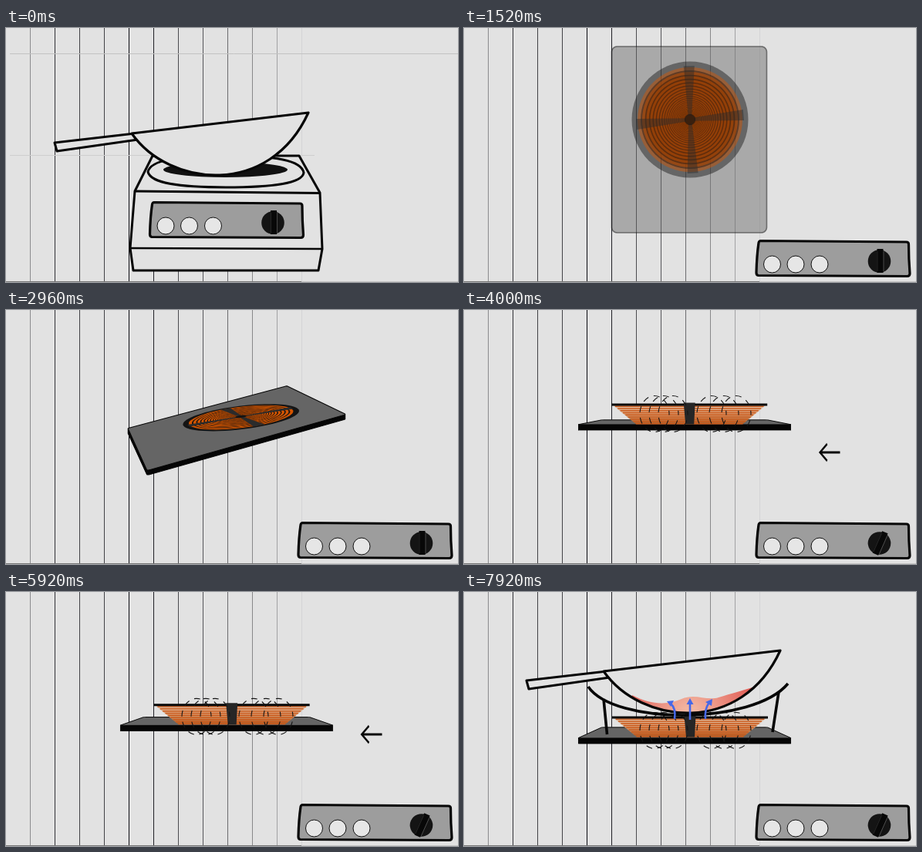
These frames come from a looping animation (586 by 330 pixels, 8000 ms). An HTML page with a canvas:

```html
<!DOCTYPE html>
<html lang="en">
<head>
<meta charset="utf-8">
<title>Cooker, taken apart</title>
<style>
  html, body { margin: 0; width: 100%; height: 100%; overflow: hidden; background: #e2e2e2; }
  canvas { display: block; width: 586px; height: 330px; }
</style>
</head>
<body>
<canvas id="stage" width="586" height="330"></canvas>
<script>
const ctx = document.getElementById('stage').getContext('2d');
const LOOP = 8000, BG = '#e2e2e2', INK = '#060606', ORANGE = '#d45500';
const TAU = Math.PI * 2, DEG = Math.PI / 180;

const mix = (a, b, p) => a + (b - a) * p;
const ramp = (t, from, to) => Math.min(1, Math.max(0, (t - from) / (to - from)));
const ease = (t, from, to) => {
  const p = ramp(t, from, to);
  return p < 0.5 ? 2 * p * p : 1 - 2 * (1 - p) ** 2;
};

function paint(path, fill, stroke, width = 3) {
  if (fill) { ctx.fillStyle = fill; ctx.fill(path); }
  if (stroke) { ctx.strokeStyle = stroke; ctx.lineWidth = width; ctx.stroke(path); }
}

function group(x, y, draw, alpha = 1) {
  ctx.save();
  ctx.translate(x, y);
  ctx.globalAlpha *= alpha;
  draw();
  ctx.restore();
}

function polygon(points) {
  const path = new Path2D();
  points.forEach(([x, y]) => path.lineTo(x, y));
  path.closePath();
  return path;
}

function oval(x, y, rx, ry = rx) {
  const path = new Path2D();
  path.ellipse(x, y, rx, ry, 0, 0, TAU);
  return path;
}

function line(x1, y1, x2, y2, color, width) {
  paint(new Path2D(`M${x1},${y1}L${x2},${y2}`), null, color, width);
}

function drawGrid(t) {
  const strength = [0.4, 0.82, 0.75, 0.75, 1, 0.9, 0.7, 0.65, 0.55, 0.42, 0.3, 0.06];
  strength.forEach((a, i) => line(31.5 + 32 * i, 0, 31.5 + 32 * i, 330, `rgba(12,12,18,${a})`, 1));
  line(0, 329.5, 383, 329.5, '#777', 1);
  line(383, 329.5, 586, 329.5, '#c4c4c4', 1);
  if (t >= 1200) return;
  ctx.save();
  if (t > 500) ctx.setLineDash([30, 9]);
  line(5, 33.5, t > 500 ? 130 : 586, 33.5, '#c2c2c2', 1);
  line(5, 165.5, t > 500 ? 158 : 400, 165.5, '#cecece', 1);
  ctx.restore();
}

function drawStove() {
  paint(polygon([[190, 166], [380, 166], [407, 214], [410, 287], [405, 315], [165, 315], [161, 286], [167, 212]]), BG, INK);
  line(167, 212, 407, 214.5, INK, 3);
  line(161, 286, 410, 287, INK, 2.5);
  const rim = new Path2D('M184,187C187,172 220,166 285,166S383,172 386,188C384,202 345,207 285,207S188,202 184,187Z');
  paint(rim, BG, INK);
  paint(oval(284.5, 184, 80.5, 10), '#111');
}

const panelShape = new Path2D('M192,226.5L381,228Q384,228 384,231Q384,250 385.5,269Q385.5,272.5 382,272.5L189,271.5Q186.5,271 186.5,268Q187,246 189.5,229Q190,226.5 192,226.5Z');

function drawPanel(turn) {
  paint(panelShape, '#9d9d9d', INK, 3.2);
  for (const x of [207, 237.5, 268.5]) paint(oval(x, 257, 11), '#e6e6e6', '#111', 1);
  group(346, 253, () => {
    ctx.rotate(turn);
    paint(oval(0, 0, 14.8), '#141414');
    ctx.fillStyle = '#080808';
    ctx.fillRect(-3, -16, 8, 31);
    line(5.5, -13, 5.5, 13, '#555', 0.8);
    line(-2.5, -13, -2.5, 13, '#2c2c2c', 0.8);
  });
}

const wokBowl = new Path2D('M163,137C212,207 342,220 392,110Z');

function drawWok(food) {
  paint(polygon([[63, 149], [167, 137], [171, 145], [66, 160]]), BG, INK);
  paint(wokBowl, BG);
  if (food > 0) {
    ctx.save();
    ctx.clip(wokBowl);
    const glow = ctx.createRadialGradient(275, 195, 4, 275, 190, 95);
    glow.addColorStop(0, '#f4bda6');
    glow.addColorStop(0.45, '#ea8b7d');
    glow.addColorStop(1, '#e0504b');
    ctx.globalAlpha *= food;
    paint(new Path2D('M200,168C225,181 246,181 264,173S296,176 312,171S345,162 370,153V200H200Z'), glow);
    ctx.restore();
  }
  paint(wokBowl, null, INK, 3.2);
}

// Projects a point given in its own centred plane onto the stage.
function projector(cx, cy, spin, tilt, squash, roll) {
  return (u, v) => {
    const x = u * Math.cos(spin) - v * Math.sin(spin);
    const depth = u * Math.sin(spin) + v * Math.cos(spin);
    const y = depth * squash;
    const w = 1 / (1 - 0.00125 * Math.sin(tilt) * depth);
    return [
      cx + w * (x * Math.cos(roll) - y * Math.sin(roll)),
      cy + w * (x * Math.sin(roll) + y * Math.cos(roll))
    ];
  };
}

function drawCoil(at) {
  const polar = (r, a) => at(r * Math.cos(a), r * Math.sin(a));
  const disc = (r, color) => {
    const points = [];
    for (let i = 0; i < 64; i++) points.push(polar(r, i / 64 * TAU));
    paint(polygon(points), color);
  };
  disc(75.5, '#141414');
  for (let i = 0; i < 25; i++) {
    const r = 68 * 0.912 ** i;
    disc(r, ORANGE);
    disc(r * 0.941, '#1b1512');
  }
  for (const degrees of [-5, 87, 175, 269]) {
    const a = degrees * DEG;
    paint(polygon([polar(70, a - 0.1), polar(70, a + 0.1), polar(6, a + 0.4), polar(6, a - 0.4)]), '#2b2b2b');
  }
  disc(7.2, '#141414');
}

function drawPlate(t, showCoil) {
  const p = ease(t, 2380, 3180), drop = ease(t, 5640, 6150);
  const spin = 90 * DEG * p ** 0.87, tilt = 88.3 * DEG * p ** 1.1;
  const squash = Math.cos(tilt) + 0.039 * drop;
  const roll = -130 * DEG * p ** 3 * (1 - p);
  const project = projector(mix(292, 286, p), mix(145, 145.5, p) + 36.5 * drop, spin, tilt, squash, roll);

  const radius = mix(7, 2, p), outline = [];
  [[1, 1], [-1, 1], [-1, -1], [1, -1]].forEach(([sx, sy], corner) => {
    for (let i = 0; i <= 5; i++) {
      const a = (corner + i / 5) * Math.PI / 2;
      outline.push(project(
        sx * (100.5 - radius) + radius * Math.cos(a),
        sy * (121 - radius) + radius * Math.sin(a)
      ));
    }
  });
  const top = polygon(outline), edge = mix(1.6, 1, p);
  for (let h = Math.round(6.5 * p); h > 0; h--) group(0, h, () => paint(top, INK, INK, edge));
  paint(top, '#656565', INK, edge);
  if (!showCoil) return;

  // The coil lifts off the plate and levels out ahead of it.
  const [x, y] = project(1, -26 + 20 * p ** 6);
  drawCoil(projector(x, y - 4 * p ** 3, spin, tilt, squash * (1 - 0.33 * p), roll * (1 - 0.5 * p)));
}

function drawCone(t, grow) {
  const drop = ease(t, 5640, 6150);
  const base = 148.5 + 40 * drop, height = 25.5 * grow, cx = 292.2 + drop * 0.8;
  const topHalf = mix(72, 100, grow), lowHalf = 69;
  const y0 = base - height;
  const body = ctx.createLinearGradient(0, y0, 0, base);
  body.addColorStop(0, '#e3cbb5');
  body.addColorStop(0.5, '#d79b70');
  body.addColorStop(1, '#a8571f');
  paint(polygon([[cx - topHalf, y0], [cx + topHalf, y0], [cx + lowHalf, base], [cx - lowHalf, base]]), body);
  for (let i = 0; i < 9; i++) {
    const f = (i + 0.8) / 9.2, half = mix(topHalf, lowHalf, f) - 1;
    line(cx - half, y0 + height * f, cx + half, y0 + height * f, '#cb5a1c', 1.5 * grow);
  }
  line(cx - topHalf - 1, y0, cx + topHalf + 1, y0, INK, 3);
  paint(polygon([[cx - 7.5, y0 - 2.5], [cx + 7.5, y0 - 2.5], [cx + 6, base], [cx - 5, base]]), '#262626');
}

const phase = t => (t - 6640) / 1120 * TAU;

function drawField(t) {
  const y = 135 + 45 * ease(t, 5640, 6150);
  ctx.save();
  ctx.setLineDash([8, 7]);
  ctx.lineDashOffset = 30 * Math.sin(phase(t));
  for (const x of [247, 259, 271, 321, 337, 353]) paint(oval(x, y, 19, 23.5), null, '#151515', 1.1);
  ctx.restore();
}

function drawCurrent(t) {
  group(487.5, 185, () => {
    ctx.scale(Math.cos(phase(t)), 1);
    ctx.lineJoin = 'miter';
    paint(new Path2D('M0,0H41M27,-11L42,0L27,11'), null, INK, 3);
  });
}

function drawSupport() {
  paint(new Path2D('M161,123C195,173 375,173 420,119'), null, INK, 3.6);
  paint(new Path2D('M181,139L185.5,185M408,130L400,182'), null, INK, 3.6);
}

function drawHeat(grow) {
  const blue = '#4668e8';
  ctx.save();
  ctx.beginPath();
  ctx.rect(250, 166 - 29 * grow, 90, 29 * grow);
  ctx.clip();
  paint(new Path2D('M273,165Q275,151 268,145M293,166V145M313,165Q312,152 317,145'), null, blue, 2.6);
  paint(polygon([[263, 142], [272, 141], [268, 149]]), blue);
  paint(polygon([[293, 138], [297.5, 146], [288.5, 146]]), blue);
  paint(polygon([[322, 139], [321, 148], [313, 143]]), blue);
  ctx.restore();
}

function draw(t) {
  ctx.fillStyle = BG;
  ctx.fillRect(0, 0, 586, 330);
  ctx.lineJoin = 'round';
  drawGrid(t);

  if (t < 600) group(0, 0, drawStove, 1 - ramp(t, 80, 560));
  const turn = 0.42 * ease(t, 3560, 4040);
  group(192.5 * ease(t, 80, 880), 50 * ease(t, 80, 1040), () => drawPanel(turn));
  if (t < 800) group(0, -205 * ease(t, 80, 720), () => drawWok(0));

  const cone = ease(t, 3180, 3720);
  if (t > 1200) group(0, 0, () => drawPlate(t, cone === 0), ramp(t, 1200, 1900));
  if (cone > 0) drawCone(t, cone);
  if (t > 3880) drawField(t);
  if (t > 3880 && t < 7200) drawCurrent(t);

  if (t > 5900) group(0, -190 * (1 - ease(t, 5900, 6735)), drawSupport);
  if (t > 6480) {
    const fall = -170 * (1 - ease(t, 6480, 7280));
    group(18, -34 + fall, () => drawWok(ramp(t, 7360, 7640)));
  }
  if (t > 7520) drawHeat(ease(t, 7520, 7880));
}

const start = performance.now();
function tick() {
  draw((performance.now() - start) % LOOP);
  requestAnimationFrame(tick);
}
tick();
</script>
</body>
</html>
```
